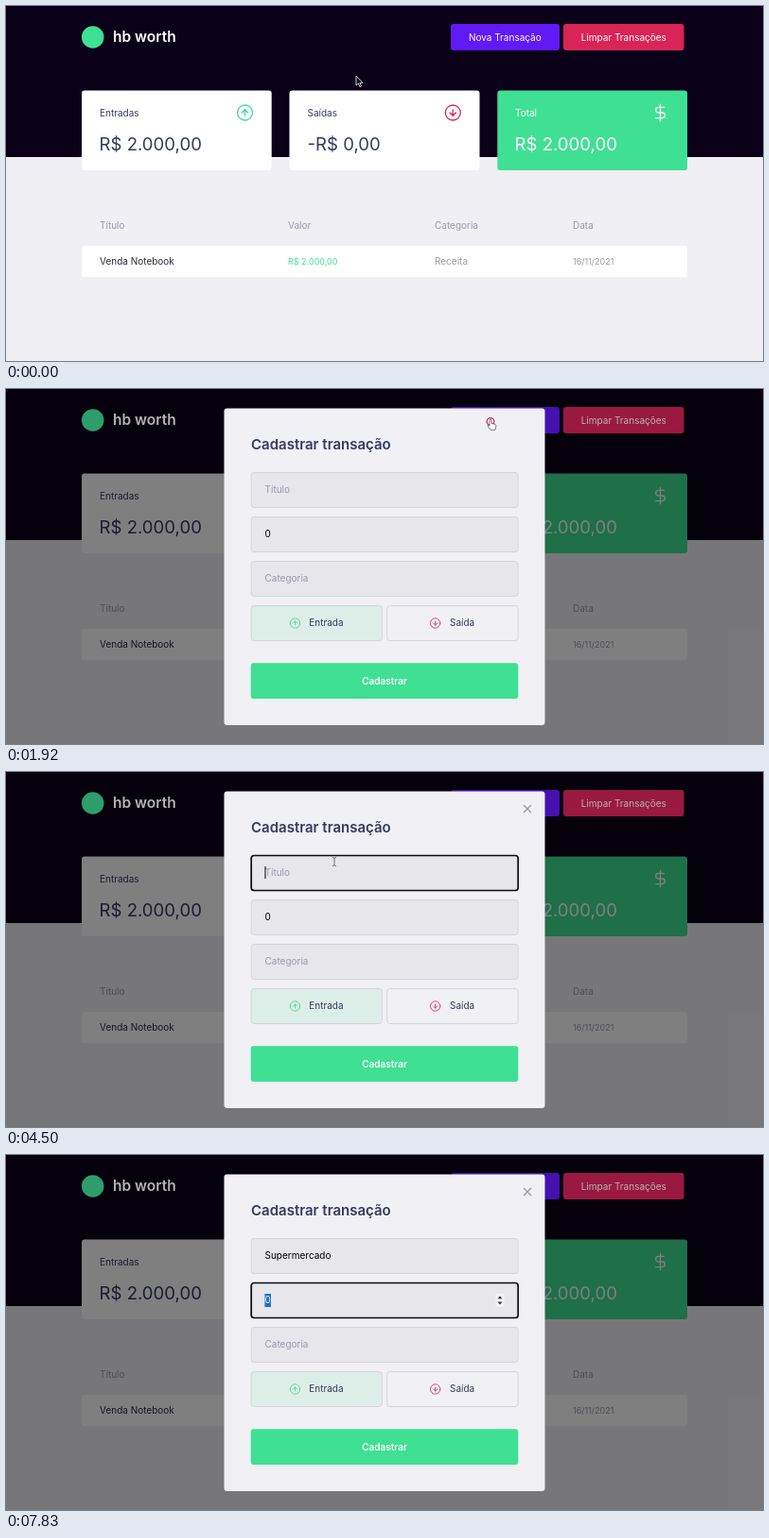
These frames come from a looping animation (800x376 px, 8000 ms). An HTML page:

```html
<!DOCTYPE html>
<html lang="pt-BR">
<head>
<meta charset="utf-8">
<title>Transações</title>
<style>
  html, body { margin: 0; width: 100%; height: 100%; overflow: hidden; background: #efeff4; }
  svg { display: block; width: 800px; height: 376px; font: 10px Inter, sans-serif; fill: #363a5c; }
  .white { fill: #fff; }
  .muted { fill: #9a9aae; }
  .ink { fill: #000; }
  .green { fill: #3fe094; }
  .big { font-size: 18.6px; }
  .digits { font-size: 9px; }
  .mid { text-anchor: middle; }
  .bold { font-weight: 600; }
  .field { fill: #e6e6eb; stroke: #d5d5dc; }
  .icon { fill: none; stroke-width: 1.6; stroke-linecap: round; stroke-linejoin: round; }
  .up { stroke: #3fd894; }
  .down { stroke: #d92456; }
</style>
</head>
<body>
<svg viewBox="0 0 800 376">
  <defs>
    <path id="arrow" d="M-10 0a10 10 0 1 0 20 0a10 10 0 1 0 -20 0M0 4V-4M-4 0L0 -4L4 0"/>
    <path id="dollar" d="M0 -11V11M5 -7H-2.5a3.5 3.5 0 0 0 0 7h5a3.5 3.5 0 0 1 0 7H-6"/>
  </defs>

  <rect width="800" height="376" fill="#efeff4"/>
  <rect width="800" height="160" fill="#0b0119"/>

  <g class="white">
    <rect x="80" y="89.5" width="200.7" height="84.5" rx="3"/>
    <rect x="299.5" y="89.5" width="201" height="84.5" rx="3"/>
    <rect x="519.3" y="89.5" width="200.7" height="84.5" rx="3" class="green"/>
    <rect x="80" y="254" width="640" height="33.3" rx="3"/>
  </g>
  <text x="99" y="116.5">Entradas</text>
  <text x="318.5" y="116.5">Saídas</text>
  <text x="538" y="116.5" class="white">Total</text>
  <text x="98.5" y="152.5" class="big">R$ 2.000,00</text>
  <text x="318.5" y="152.5" class="big">-R$ 0,00</text>
  <text x="537.5" y="152.5" class="big white">R$ 2.000,00</text>
  <use href="#arrow" class="icon up" transform="translate(252.5 113) scale(.8)"/>
  <use href="#arrow" class="icon down" transform="translate(472.3 113) rotate(180) scale(.8)"/>
  <use href="#dollar" class="icon" stroke="#fff" transform="translate(691.5 113) scale(.8)"/>

  <g class="muted">
    <text x="99" y="236">Título</text>
    <text x="298" y="236">Valor</text>
    <text x="453" y="236">Categoria</text>
    <text x="599" y="236">Data</text>
    <text x="453" y="274">Receita</text>
    <text x="599" y="274" class="digits">16/11/2021</text>
  </g>
  <text x="99" y="274" fill="#2b2840">Venda Notebook</text>
  <text x="298" y="274" class="digits green">R$ 2.000,00</text>

  <rect id="shade" width="800" height="376" fill-opacity=".5" class="ink"/>

  <g id="header" class="white">
    <circle cx="91.7" cy="33" r="11.8" class="green"/>
    <text x="113" y="38" class="bold" font-size="15.5">hb worth</text>
    <g id="newButton">
      <rect x="470" y="19" width="115" height="28" rx="3" fill="#6119f5"/>
      <text x="527.3" y="36.7" class="mid">Nova Transação</text>
    </g>
    <rect x="589" y="19" width="127.5" height="28" rx="3" fill="#d92456"/>
    <text x="652.8" y="36.7" class="mid">Limpar Transações</text>
  </g>

  <g id="modal">
    <rect x="230.5" y="20.5" width="339" height="335.5" rx="3" fill="#f0f0f5"/>
    <path id="close" d="M547 35l8 8m0 -8l-8 8" stroke="#9b9ba5" stroke-width="1.4"/>
    <text x="259" y="64" class="bold" font-size="15">Cadastrar transação</text>
    <g class="field">
      <rect x="259.2" y="88.5" width="282" height="37" rx="3"/>
      <rect x="259.2" y="135.5" width="282" height="37" rx="3"/>
      <rect x="259.2" y="182.5" width="282" height="37" rx="3"/>
      <rect x="259.2" y="229.5" width="138.3" height="37" rx="3" style="fill:#ddeee8"/>
      <rect x="402.7" y="229.5" width="138.5" height="37" rx="3" style="fill:#f0f0f5"/>
    </g>
    <rect id="focus" x="259.2" width="282" height="37" rx="3" fill="none" stroke="#0b0b10" stroke-width="1.7"/>
    <rect id="selection" x="273.5" y="147" width="6.5" height="14" fill="#1c6fc4"/>
    <text id="title" x="273.5" y="110.3"></text>
    <text id="amount" x="273.5" y="157.3" class="ink">0</text>
    <text x="273.5" y="204.3" class="muted">Categoria</text>
    <rect id="caret" y="100" width="1" height="13" class="ink"/>
    <g id="spinner">
      <rect x="517.5" y="147" width="9" height="14" fill="#f2f2f4"/>
      <path d="M519.6 152.2l2.4 -3l2.4 3zM519.6 155.6l2.4 3l2.4 -3z" fill="#333"/>
    </g>
    <use href="#arrow" class="icon up" transform="translate(305.5 248) scale(.52)"/>
    <use href="#arrow" class="icon down" stroke-width="2" transform="translate(453.7 248) rotate(180) scale(.52)"/>
    <text x="320.3" y="251.3">Entrada</text>
    <text x="469" y="251.3">Saída</text>
    <rect x="258.7" y="290.3" width="282.6" height="37.6" rx="3" class="green"/>
    <text x="400" y="312.5" class="white mid bold">Cadastrar</text>
  </g>

  <circle id="ring" fill="none" stroke="#d3204c" stroke-width="1.2"/>
  <g id="pointer">
    <path id="plain" d="M0 0V10L2.4 8L4 11.7L5.6 11L4 7.4H7Z" fill="#111" stroke="#ddd" stroke-width=".9"/>
    <path id="hand" d="M0 1.2Q0 0 1 0T2 1.2V4.4L6 5.3Q7.2 5.8 6.8 7.5L6 11.3H1L-1.8 7.5Q-2.2 6.2 -1 6.3L0 7.2Z" fill="#fff" stroke="#444" stroke-width=".7"/>
    <path id="beam" d="M-2 -4.5Q0 -4.5 0 -3.3Q0 -4.5 2 -4.5M0 -3.3V3.3M-2 4.5Q0 4.5 0 3.3Q0 4.5 2 4.5" fill="none" stroke="#666" stroke-width=".9"/>
  </g>
</svg>
<script>
const LOOP = 8000, STEP = 250 / 3;
const OPEN = 1880, FOCUS = 3250, TAB = 7400;
const WORD = "Supermercado";
const KEYS = [4660, 4830, 5080, 5410, 5660, 6080, 6240, 6410, 6580, 6740, 6910, 7080];
// Pointer moves: start time, end time, target x, target y
const START = [370, 74];
const MOVES = [[400, 1670, 511, 32], [2060, 2830, 353, 101], [3060, 3240, 347, 95]];

const $ = id => document.getElementById(id);
const show = (id, on) => $(id).style.display = on ? "" : "none";
const clamp = v => Math.max(0, Math.min(1, v));
const ease = v => v * v * (3 - 2 * v);

function pointerAt(t) {
  let [x, y] = START;
  for (const [from, to, tx, ty] of MOVES) {
    const p = ease(clamp((t - from) / (to - from)));
    x += (tx - x) * p;
    y += (ty - y) * p;
  }
  return [x, y];
}

function drawPointer(t, open) {
  const [x, y] = pointerAt(t);
  const overButton = t < 2060 && x > 470 && y < 47;
  const overField = open && x < 541 && y > 88 && y < 126;
  $("pointer").setAttribute("transform", `translate(${x} ${y})`);
  show("pointer", t < KEYS[0]);
  show("hand", overButton);
  show("beam", overField);
  show("plain", !overButton && !overField);

  const age = t - (t < FOCUS ? OPEN : FOCUS);
  const ring = $("ring");
  ring.setAttribute("cx", t < FOCUS ? 512 : x - .5);
  ring.setAttribute("cy", t < FOCUS ? 34.5 : y);
  ring.setAttribute("r", Math.max(0, Math.min(10.5, 2 + age * .05)));
  ring.style.opacity = age < 0 ? 0 : clamp((550 - age) / 250);
}

function drawForm(t) {
  const typed = KEYS.filter(k => k <= t).length;
  const title = $("title");
  title.textContent = typed ? WORD.slice(0, typed) : "Título";
  title.setAttribute("class", typed ? "ink" : "muted");

  const onAmount = t >= TAB;
  show("focus", t >= FOCUS);
  $("focus").setAttribute("y", onAmount ? 135.5 : 88.5);
  show("selection", onAmount);
  show("spinner", onAmount);
  $("amount").setAttribute("class", onAmount ? "white" : "ink");

  const lastInput = typed ? KEYS[typed - 1] : FOCUS + 150;
  show("caret", t >= FOCUS && !onAmount && (t - lastInput + 1000) % 1000 < 500);
  $("caret").setAttribute("x", 273.5 + (typed ? title.getComputedTextLength() : 0));
}

function draw(now) {
  const t = Math.floor((now % LOOP + 4) / STEP) * STEP;
  const open = t >= OPEN;
  show("shade", open);
  show("modal", open);
  show("close", t >= 1990);
  $("header").style.opacity = open ? .7 : 1;
  const hover = open ? 0 : clamp((t - 1230) / 200);
  $("newButton").style.filter = `brightness(${1 - .3 * hover})`;
  drawForm(t);
  drawPointer(t, open);
}

const began = performance.now();
function tick() {
  draw(performance.now() - began);
  requestAnimationFrame(tick);
}
tick();
</script>
</body>
</html>
```
